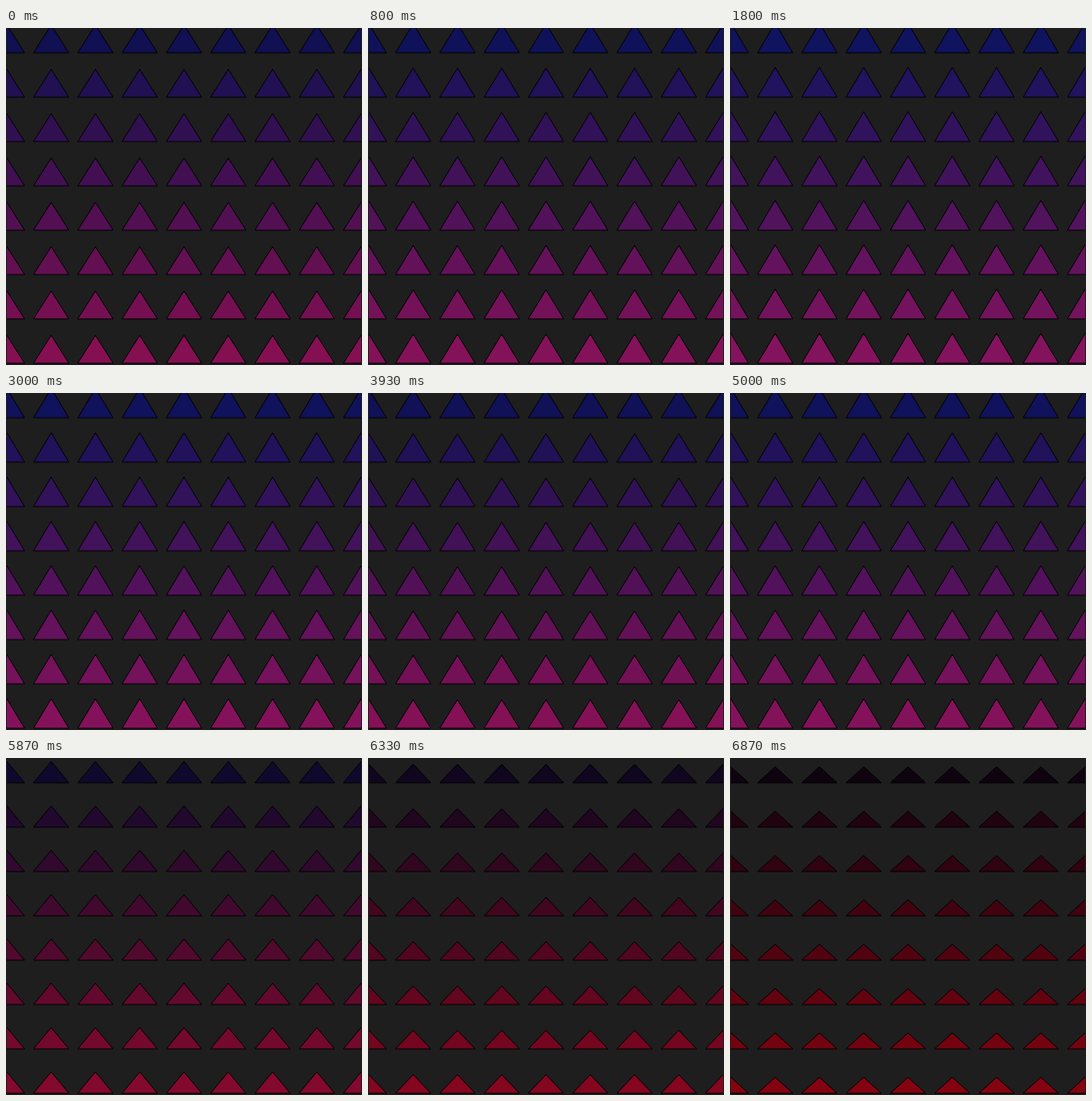
Write an HTML page with a canvas that moves like this. It is 402 by 380 pixels and loops after 6940 ms.

```html
<!DOCTYPE html>
<html lang="en">
<head>
<meta charset="utf-8">
<title>Triangles</title>
<style>
  html, body { margin: 0; width: 100%; height: 100%; overflow: hidden; background: #1e1e1e; }
  canvas { display: block; }
</style>
</head>
<body>
<canvas id="stage" width="402" height="380"></canvas>
<script>
const ctx = document.getElementById('stage').getContext('2d');
const LOOP = 6940, FPS = 15;
const PITCH = 50, HALF = 20, LEFT = 1, BASE = 28;

// [time in ms, triangle height]
const keys = [
  [0, 31.4], [1300, 33.4], [1800, 33.6], [3000, 33.2],
  [3930, 32.2], [5000, 33.2], [5870, 24], [6870, 18], [6940, 17.6]
];

const slope = i => (keys[i + 1][1] - keys[i][1]) / (keys[i + 1][0] - keys[i][0]);

// Flat at peaks and dips, smooth elsewhere
function tangent(i) {
  if (i === 0) return slope(0);
  if (i === keys.length - 1) return slope(i - 1);
  const a = slope(i - 1), b = slope(i);
  return a * b > 0 ? 2 * a * b / (a + b) : 0;
}

function heightAt(t) {
  let i = 0;
  while (i < keys.length - 2 && t >= keys[i + 1][0]) i++;
  const [t0, h0] = keys[i], [t1, h1] = keys[i + 1];
  const d = t1 - t0, u = (t - t0) / d, v = 1 - u;
  return h0 * v * v * (1 + 2 * u) + h1 * u * u * (3 - 2 * u)
    + d * u * v * (tangent(i) * v - tangent(i + 1) * u);
}

function triangle(x, y, h) {
  ctx.beginPath();
  ctx.moveTo(x - HALF, y);
  ctx.lineTo(x, y - h);
  ctx.lineTo(x + HALF, y);
  ctx.closePath();
  ctx.fill();
  ctx.stroke();
}

function draw(t) {
  const h = heightAt(t);
  const blue = Math.round((h - 14.7) * 4.9);
  const green = Math.round(blue / 5);
  ctx.fillStyle = '#1e1e1e';
  ctx.fillRect(0, 0, 402, 380);
  ctx.save();
  ctx.beginPath();
  ctx.rect(LEFT, 0, 400, 380);
  ctx.clip();
  ctx.strokeStyle = '#000';
  ctx.lineWidth = 1;
  for (let row = 0; row < 8; row++) {
    ctx.fillStyle = `rgb(${Math.round(16 + row * 16.6)}, ${green}, ${blue})`;
    for (let col = 0; col <= 8; col++) {
      triangle(LEFT + col * PITCH, BASE + row * PITCH, h);
    }
  }
  ctx.restore();
}

const start = performance.now();
function tick() {
  const t = (performance.now() - start) % LOOP;
  draw(Math.floor(t * FPS / 1000 + 0.05) * 1000 / FPS);
  requestAnimationFrame(tick);
}
tick();
</script>
</body>
</html>
```
